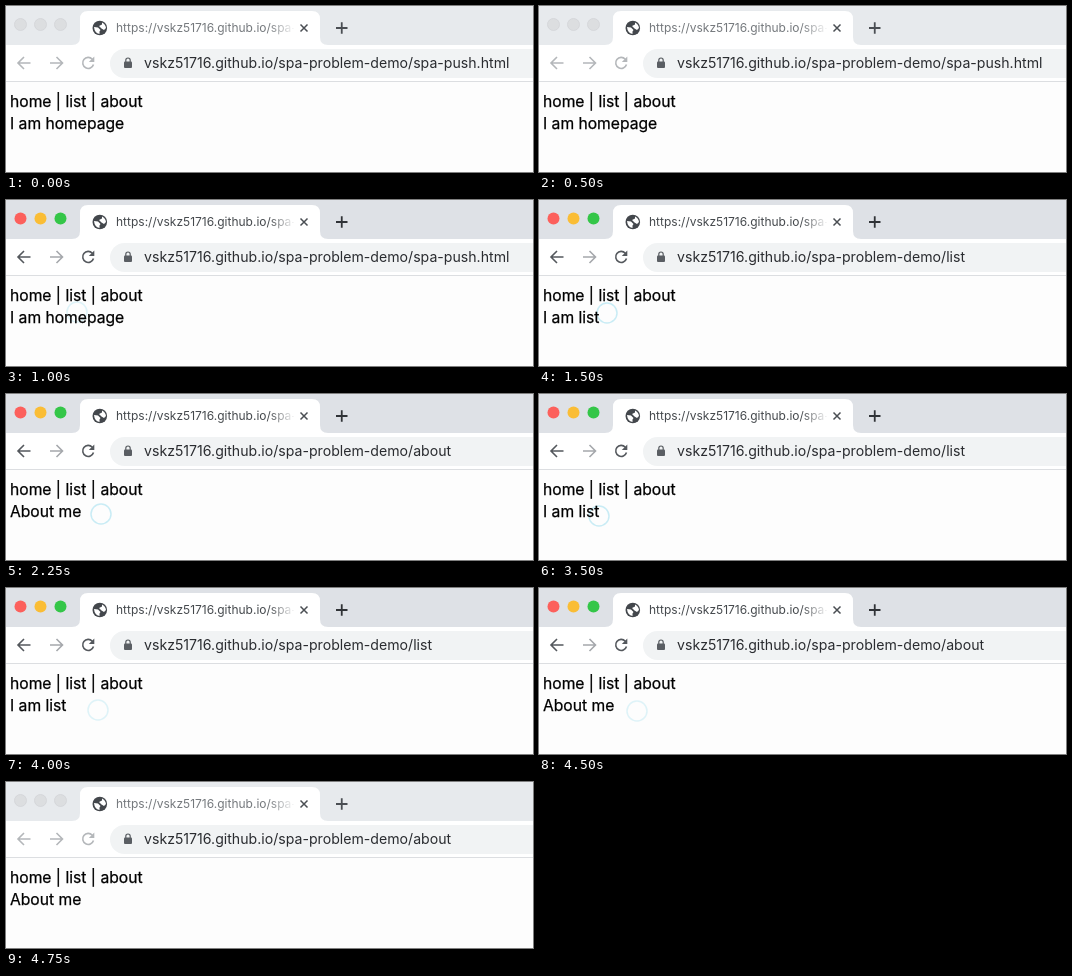
Write an HTML page that moves like this. It is 527x166 px and loops after 5250 ms.

```html
<!DOCTYPE html>
<html lang="en">
<head>
<meta charset="utf-8">
<title>Browser history demo</title>
<style>
  html, body { margin: 0; width: 100%; height: 100%; overflow: hidden; background: #fdfdfd; }
  #stage {
    display: block; width: 527px; height: 166px;
    font-family: Inter, "Open Sans", sans-serif;
    --strip: #dee1e6; --icon: #54585d; --forward: #a5a8ac; --title: #45494d; --plus: #303337;
    --red: #fc605c; --yellow: #fabd35; --green: #34c648; --rim: none;
  }
  #stage.inactive {
    --strip: #e7eaed; --icon: #b4b7ba; --forward: #b4b7ba; --title: #75797d; --plus: #4a4e53;
    --red: #dcdee0; --yellow: #dcdee0; --green: #dcdee0; --rim: #d2d4d7;
  }
  .line { fill: none; stroke: var(--icon); stroke-width: 1.6; }
  .lights { stroke: var(--rim); stroke-width: .8; }
  .page { font-size: 15.65px; fill: #000; stroke: #000; stroke-width: .25px; }
</style>
</head>
<body>
<svg id="stage" viewBox="0 0 527 166">
  <rect width="527" height="166" fill="#fdfdfd"/>

  <!-- tab strip -->
  <rect width="527" height="39" fill="var(--strip)"/>
  <g class="lights">
    <circle cx="14.5" cy="18.5" r="6" fill="var(--red)"/>
    <circle cx="34.5" cy="18.5" r="6" fill="var(--yellow)"/>
    <circle cx="54.5" cy="18.5" r="6" fill="var(--green)"/>
  </g>
  <path d="M66 39q8 0 8-8V13q0-8 8-8H306q8 0 8 8V31q0 8 8 8z" fill="#fff"/>
  <circle cx="93.8" cy="22" r="7.3" fill="#43474c"/>
  <path d="M88 21l4 .5l2.500 2.500l-1 1.500v2.500q-5-1-5.500-7zM96 16.500q3.500 1.500 4 5.500l-2 2l-2.500-1.500l-2.500-2.500l3-1.500z" fill="#fff"/>
  <svg x="110" width="178" height="39">
    <text y="26" font-size="12" fill="var(--title)">https://vskz51716.github.io/spa-p</text>
  </svg>
  <linearGradient id="fade">
    <stop stop-color="#fff" stop-opacity="0"/>
    <stop offset="1" stop-color="#fff"/>
  </linearGradient>
  <rect x="262" y="12" width="27" height="20" fill="url(#fade)"/>
  <path d="M294.5 18.5l7 7m0-7l-7 7" fill="none" stroke="#4a4e53" stroke-width="1.5"/>
  <path d="M330 22h11.500m-5.750-5.750v11.500" fill="none" stroke="var(--plus)" stroke-width="1.8"/>

  <!-- toolbar -->
  <rect y="39" width="527" height="37" fill="#fff"/>
  <rect y="75" width="527" height="1" fill="#dcdee1"/>
  <path class="line" d="M24.5 57H12m6-6l-6 6l6 6"/>
  <path class="line" style="stroke:var(--forward)" d="M44 57H56.5m-6-6l6 6l-6 6"/>
  <path class="line" d="M86.3 53.2A5.5 5.5 0 1 0 87.5 58.5"/>
  <path d="M88.3 50.5v5.5h-5.5z" fill="var(--icon)"/>
  <rect x="104" y="43" width="450" height="29" rx="14.5" fill="#f1f3f4"/>
  <rect x="118" y="55.5" width="8" height="6.5" rx="1" fill="#5a5e63"/>
  <path d="M119.8 56v-1.800a2.200 2.200 0 0 1 4.400 0v1.800" fill="none" stroke="#5a5e63" stroke-width="1.2"/>
  <text id="url" x="138" y="62" font-size="14.13" fill="#2a2c30"></text>

  <!-- page -->
  <circle id="cursor" r="10" fill="none" stroke="#bfe9f3" stroke-width="1.5"/>
  <text class="page" x="4" y="101">home | list | about</text>
  <text class="page" id="content" x="4" y="123"></text>
</svg>
<script>
  const STEP = 250, LOOP = 5250;
  const BASE = "vskz51716.github.io/spa-problem-demo/";
  const $ = id => document.getElementById(id);

  // Each entry starts at the given time and holds until the next one.
  const urls = [[0, "spa-push.html"], [1500, "list"], [2250, "about"],
                [3000, "home"], [3500, "list"], [4250, "about"]];
  const contents = [[0, "I am homepage"], [1250, "I am list"], [2250, "About me"],
                    [3000, "I am homepage"], [3500, "I am list"], [4250, "About me"]];

  // Pointer position at each step: x, y, and optionally opacity.
  const pointer = [
    null, null, null, [83, 112, .5], [71, 112, .5],
    [68, 113], [68, 113], [94, 120], [94, 120], [95, 120],
    [31, 123], [23, 121], [30, 122], [60, 123], [60, 122],
    [65, 122], [92, 122, .5], [98, 123], [98, 123, .5]
  ];

  const valueAt = (track, t) => track.filter(([start]) => start <= t).pop()[1];

  function setText(id, text) {
    if ($(id).textContent !== text) $(id).textContent = text;
  }

  function draw(now) {
    const t = now % LOOP;
    $("stage").classList.toggle("inactive", t < 1000 || t >= 4750);
    setText("url", BASE + valueAt(urls, t));
    setText("content", valueAt(contents, t));

    const [x, y, opacity = .85] = pointer[Math.floor(t / STEP)] || [0, 0, 0];
    const attributes = { cx: x, cy: y, opacity };
    for (const name in attributes) $("cursor").setAttribute(name, attributes[name]);
  }

  function tick() {
    draw(performance.now());
    requestAnimationFrame(tick);
  }
  tick();
</script>
</body>
</html>
```
